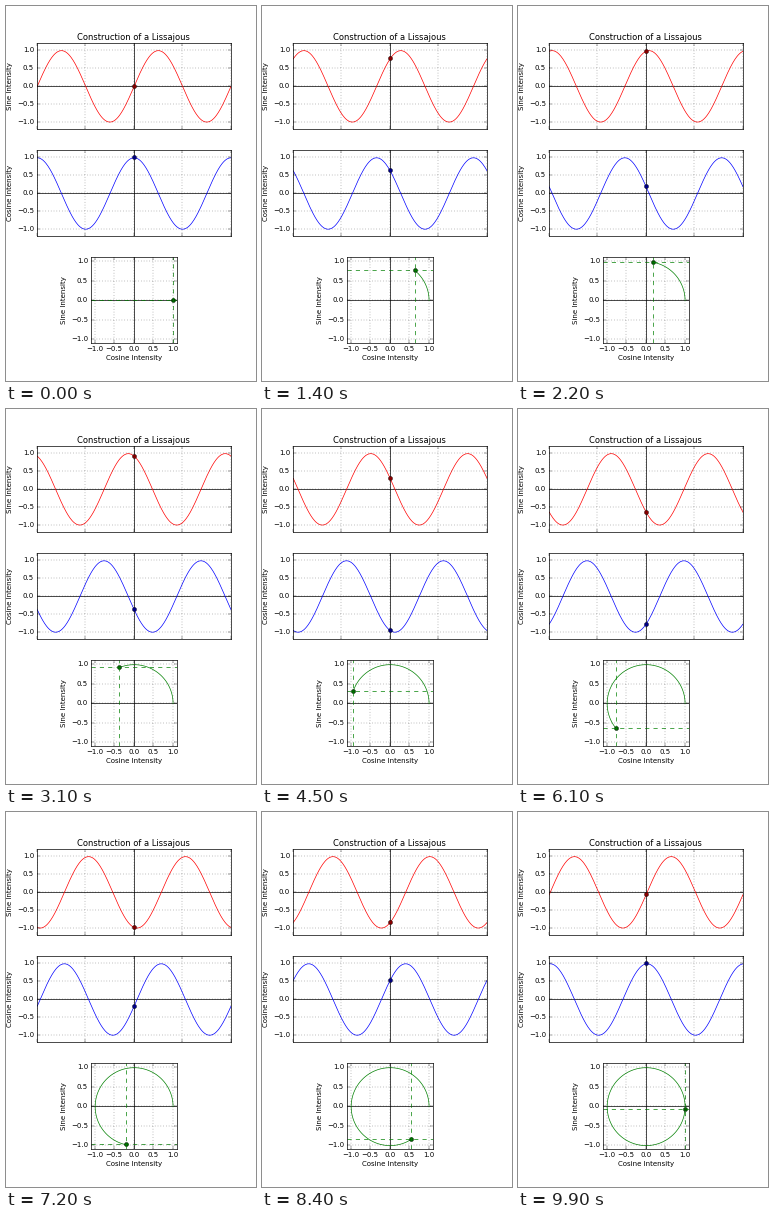
Write a matplotlib script that moves like this. It is 250 by 375 pixels and loops after 10 s.

```python
import numpy as np
import matplotlib.pyplot as plt
from matplotlib.animation import FuncAnimation
from matplotlib.transforms import ScaledTranslation

FRAMES = 100
INTERVAL = 100
W, H, DPI = 250, 375, 50
NUDGE = 0.45  # px, so that straight lines snap down to the pixel grid

plt.style.use("classic")
plt.rcParams.update({
    "font.family": "DejaVu Sans",
    "font.size": 10,
    "figure.facecolor": "white",
    "savefig.dpi": "figure",
})

fig, (sin_ax, cos_ax, orbit_ax) = plt.subplots(
    3, 1, figsize=(W / DPI, H / DPI), dpi=DPI)
dx, dy = NUDGE / W, NUDGE / H
fig.subplots_adjust(left=0.125 - dx, right=0.9 - dx,
                    bottom=0.1 + dy, top=0.9 + dy, hspace=0.25)
# Curves are not snapped, so they keep their exact place.
unsnap = ScaledTranslation(NUDGE / DPI, -NUDGE / DPI, fig.dpi_scale_trans)

x = np.linspace(-1, 1, 401)
ticks = np.linspace(-1, 1, 5)


def setup(ax, ylabel, xlim, ylim):
    ax.set_xlim(-xlim, xlim)
    ax.set_ylim(-ylim, ylim)
    ax.set_xticks(ticks)
    ax.set_yticks(ticks)
    ax.set_ylabel(ylabel)
    ax.grid(True)
    ax.axhline(0, color="k")
    ax.axvline(0, color="k")


def add_curve(ax, color, dot_color):
    curve, = ax.plot([], [], color=color, transform=ax.transData + unsnap)
    dot, = ax.plot([], [], "o", color=dot_color)
    return curve, dot


setup(sin_ax, "Sine Intensity", 1, 1.2)
setup(cos_ax, "Cosine Intensity", 1, 1.2)
setup(orbit_ax, "Sine Intensity", 1.1, 1.1)
for ax in (sin_ax, cos_ax):
    ax.set_xticklabels([])
sin_ax.set_title("Construction of a Lissajous")
orbit_ax.set_xlabel("Cosine Intensity")
orbit_ax.set_aspect("equal")

sin_wave, sin_dot = add_curve(sin_ax, "r", "darkred")
cos_wave, cos_dot = add_curve(cos_ax, "b", "darkblue")
trail, orbit_dot = add_curve(orbit_ax, "g", "darkgreen")
h_guide = orbit_ax.axhline(0, color="g", ls="--")
v_guide = orbit_ax.axvline(1, color="g", ls="--")


def update(i):
    phase = 2 * np.pi * i / FRAMES
    s, c = np.sin(phase), np.cos(phase)
    sin_wave.set_data(x, np.sin(2 * np.pi * x + phase))
    cos_wave.set_data(x, np.cos(2 * np.pi * x + phase))
    sin_dot.set_data([0], [s])
    cos_dot.set_data([0], [c])

    arc = np.linspace(0, phase, 2 * i + 1)
    trail.set_data(np.cos(arc), np.sin(arc))
    orbit_dot.set_data([c], [s])
    h_guide.set_ydata([s, s])
    v_guide.set_xdata([c, c])
    return sin_wave, cos_wave, sin_dot, cos_dot, trail, orbit_dot, h_guide, v_guide


anim = FuncAnimation(fig, update, frames=FRAMES, interval=INTERVAL,
                     repeat=True, repeat_delay=0, blit=False)
plt.show()
```
